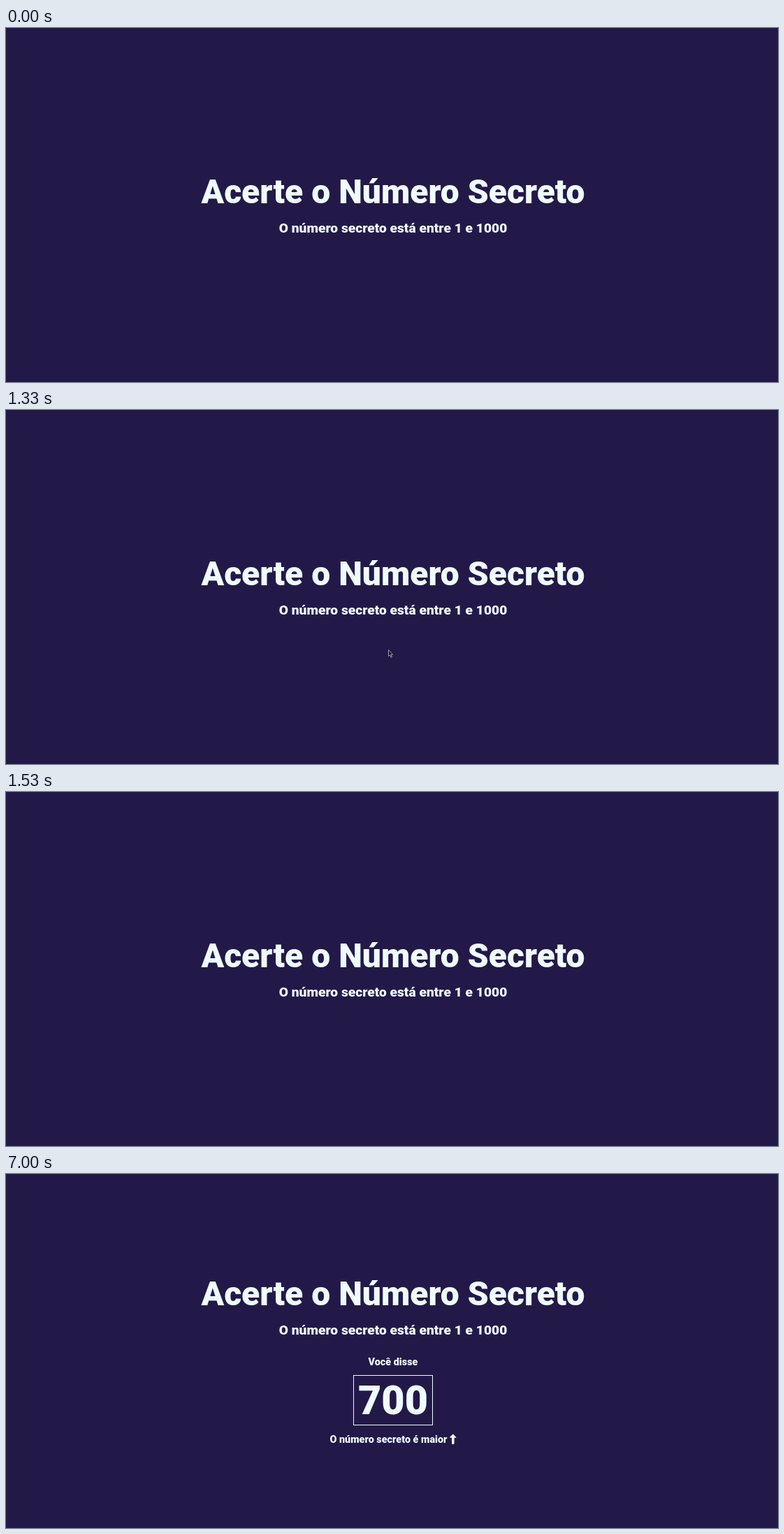
Animation of 1105x507 px, one loop 8000 ms. Source, as an HTML page:

```html
<!DOCTYPE html>
<html lang="pt-BR">
<head>
<meta charset="utf-8">
<title>Acerte o Número Secreto</title>
<style>
  html, body { margin: 0; width: 100%; height: 100%; overflow: hidden; background: #231948; }
  svg { display: block; }
  text { font: 900 14.4px Roboto, sans-serif; text-anchor: middle; fill: #effbff; }
  #title { font-size: 48px; }
  #range { font-size: 19.2px; }
  #guess { font-size: 57.6px; }
</style>
</head>
<body>
<svg width="1105" height="507" viewBox="0 0 1105 507">
  <g id="header">
    <text id="title" x="554" y="188">Acerte o Número Secreto</text>
    <text id="range" x="554" y="230">O número secreto está entre 1 e 1000</text>
  </g>
  <g id="answer">
    <text x="554" y="274">Você disse</text>
    <rect x="497.5" y="288.5" width="113" height="71" fill="none" stroke="#effbff"/>
    <text id="guess" x="554" y="344">500</text>
    <text x="547.5" y="385">O número secreto é maior</text>
    <path transform="translate(635 372.3)" fill="#effbff" stroke="#effbff" stroke-linejoin="round"
      d="M4.8 .5 9.1 4.9H6.1V14H3.5V4.9H.5Z"/>
  </g>
  <path id="cursor" fill="#17102f" stroke="#c4c2c8" stroke-width=".8"
    d="M.5 .6V9.6L2.5 7.8 4 11.3 5.4 10.7 4 7.3H6.6Z"/>
</svg>
<script>
  const LOOP = 8000, SHOW_ANSWER = 2270, LEAVE = 1530;
  const [header, answer, guess, cursor] =
    ['header', 'answer', 'guess', 'cursor'].map(id => document.getElementById(id));

  // Pointer positions as [start time, x, y]; each holds until the next.
  const path = [
    [1130, 168, 281], [1200, 340, 300], [1270, 478, 322],
    [1330, 547, 343], [1400, 546, 399], [1470, 543, 456]
  ];

  const show = (el, on) => el.setAttribute('visibility', on ? 'visible' : 'hidden');
  const move = (el, x, y) => el.setAttribute('transform', `translate(${x} ${y})`);

  function draw(now) {
    const t = now % LOOP;
    const answered = t >= SHOW_ANSWER;
    move(header, 0, answered ? 0 : 63);
    show(answer, answered);
    guess.textContent = t < 5070 ? 500 : t < 7000 ? 600 : 700;

    const pose = path.filter(p => p[0] <= t).pop();
    const moving = pose && t < LEAVE;
    show(cursor, moving);
    if (moving) move(cursor, pose[1], pose[2]);
    requestAnimationFrame(() => draw(performance.now() - start));
  }

  const start = performance.now();
  draw(0);
</script>
</body>
</html>
```
